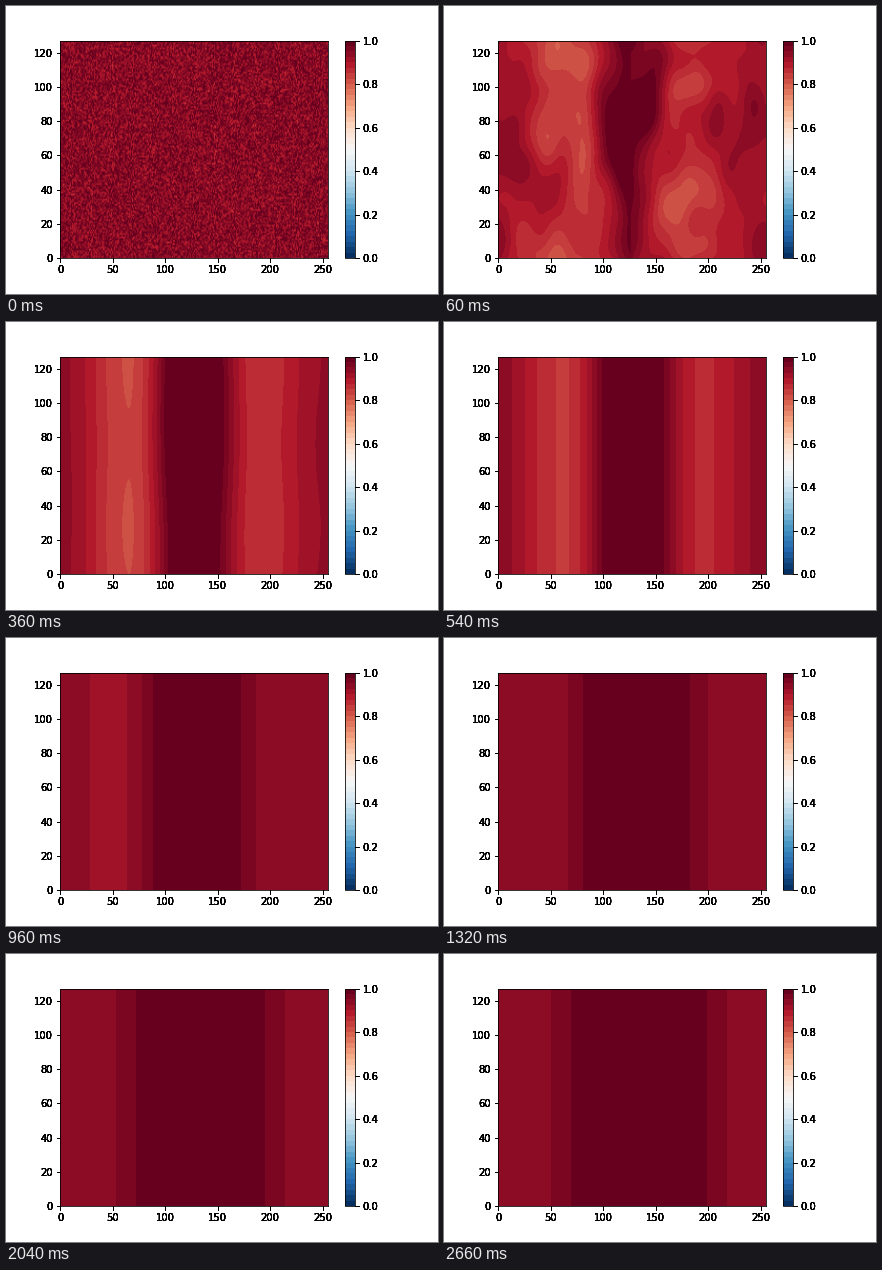
Animation, 432 px wide and 288 px high, one loop 3030 ms. Source, as a matplotlib script:

```python
import numpy as np
import matplotlib.pyplot as plt
from matplotlib.animation import FuncAnimation

W, H, DPI = 432, 288, 72
INTERVAL, LOOP = 30, 3030
NX, NY = 256, 128
LAYERS = 40
LEFT, RIGHT, TOP, BOTTOM = 54, 322, 35, 252
MERGED, SETTLED, END = 180, 540, 2660  # phase limits in ms

plt.rcParams.update({"font.family": "DejaVu Sans", "font.size": 10})

# grid nodes in stage pixels
X, Y = np.meshgrid(np.linspace(LEFT, RIGHT, NX), np.linspace(BOTTOM, TOP, NY))

# depth = number of colour layers below the darkest one
rng = np.random.default_rng(4)
noise = 5.5 * rng.random((NY, NX)) ** 1.5


def mix(a, b, k):
    return a + (b - a) * k


def smooth(sigma):
    """Noise blurred over sigma grid cells, with unit spread."""
    fx, fy = np.fft.fftfreq(NX), np.fft.fftfreq(NY)[:, None]
    low = np.exp(-2 * (np.pi * sigma) ** 2 * (fx ** 2 + fy ** 2))
    out = np.fft.ifft2(np.fft.fft2(noise - noise.mean()) * low).real
    return out / out.std()


def flank(d, length, reach, peak, rest, fall):
    """Depth at distance d from the plateau: up to peak, then back to rest."""
    rise = 1 + (peak - 1) * np.sin(np.pi / 2 * np.clip(d / reach, -1, 1))
    k = np.clip((d - reach) / (length - reach), 0, 1)
    drop = rest + (peak - rest) * np.cos(np.pi / 2 * k) ** (2 * fall)
    return np.where(d < reach, rise, drop)


def both_flanks(edges, reach, peaks, rests, fall):
    (a, b), (ra, rb) = edges, reach
    left = flank(a - X, a - LEFT, ra, peaks[0], rests[0], fall)
    right = flank(X - b, RIGHT - b, rb, peaks[1], rests[1], fall)
    return np.where(X < 187, left, right)


def forming(k):
    """The uneven middle band straightens while k goes from 0 to 1."""
    wave = (1 - k) * np.cos(2 * np.pi * (Y - 205) / 165)
    waist = (1 - np.cos(np.pi * (Y - 95) / 140)) / 2
    pinch = 20 * (1 - k) * waist ** 1.2
    spot = np.exp(-((X - 72) / 14) ** 2 - ((Y - 185) / 46) ** 2)
    reach = mix(23, 38, k) + pinch
    field = both_flanks(
        (mix(159, 158, k) + pinch, mix(212, 220, k) - pinch),
        (reach, reach),
        (mix(10.7, 6.1, k) + 0.45 * wave, mix(8.1, 5.2, k) + 0.45 * wave),
        (mix(4.4, 2.4, k), mix(4.7, 2.4, k) + 0.35 * wave),
        mix(2, 0.8, k))
    return field - 0.55 * (1 - k) * spot


def spreading(t):
    """The plateau widens, easing out, while the flanks sink."""
    u = (t - SETTLED) / (END - SETTLED)
    ease = 1 - (1 - u) ** 2
    reach = mix(38, 44, u)
    return both_flanks(
        (mix(158, 127, ease), mix(220, 263, ease)),
        (reach, reach),
        (2.5 + 3.6 * np.exp((SETTLED - t) / 280),
         2.5 + 2.7 * np.exp((SETTLED - t) / 200)),
        (2.4, 2.4), 0.8)


def depth(t):
    if t == 0:
        return noise
    if t < MERGED:
        k = t / MERGED
        blobs = 1.4 * (1 - k) * smooth(4 + 14 * k)
        return mix(3.5, forming(0), k ** 0.8) + blobs
    if t < SETTLED:
        k = 1 - np.exp((MERGED - t) / 130)
        return forming(k / (1 - np.exp((MERGED - SETTLED) / 130)))
    return spreading(t)


def held(t):
    """Time of the picture that is on show at t."""
    if t >= 2640:
        return END
    if t >= 2340:
        return 2340
    step = t // 60 * 60
    return 2100 if step == 2160 else step


def value(t):
    return np.clip(1 - depth(t) / LAYERS, 0, 1)


fig = plt.figure(figsize=(W / DPI, H / DPI), dpi=DPI, facecolor="white")
MAIN = (0.125, 0.125, 0.62, 0.755)
BAR = (338.58 / W, 0.125, 10.87 / W, 0.755)
bar_ticks = np.linspace(0, 1, 6)


def style_main(ax):
    ax.set(xlim=(0, NX - 1), ylim=(0, NY - 1),
           xticks=range(0, 251, 50), yticks=range(0, 121, 20))


ax = fig.add_axes(MAIN)
im = ax.imshow(value(0), cmap=plt.get_cmap("RdBu_r", LAYERS), vmin=0, vmax=1,
               origin="lower", aspect="auto", interpolation="bilinear",
               interpolation_stage="data",
               extent=(-0.5, NX - 0.5, -0.5, NY - 0.5))
style_main(ax)
fig.colorbar(im, cax=fig.add_axes(BAR), ticks=bar_ticks)

# repeated drawing gives the heavy lettering
for n in range(6):
    over = fig.add_axes(MAIN, label=f"main{n}", frameon=False)
    style_main(over)
    side = fig.add_axes(BAR, label=f"bar{n}", frameon=False)
    side.yaxis.tick_right()
    side.set(xticks=[], ylim=(0, 1), yticks=bar_ticks)


def update(i):
    im.set_data(value(held(i * INTERVAL)))
    return [im]


anim = FuncAnimation(fig, update, frames=LOOP // INTERVAL, interval=INTERVAL,
                     init_func=lambda: update(0), repeat=True, repeat_delay=0)
plt.show()
```
